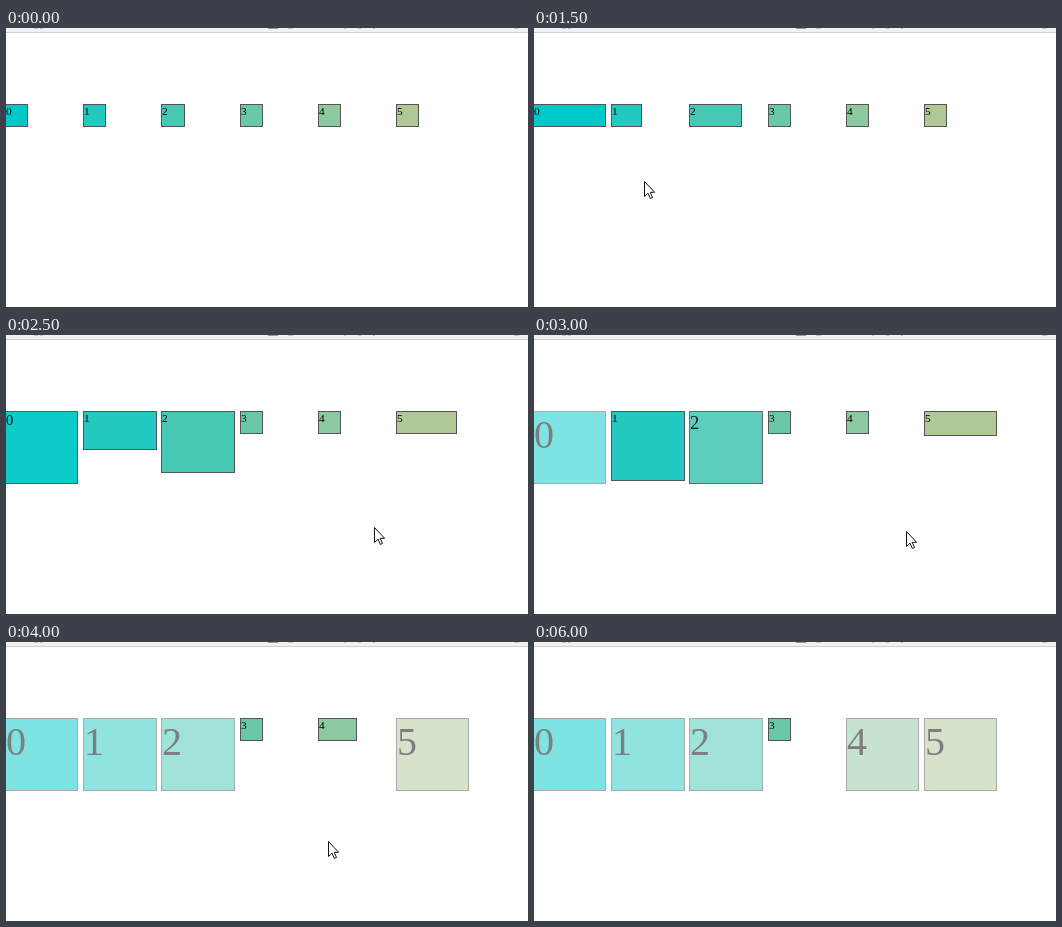
Write an HTML page that moves like this. It is 522 px wide and 279 px high and loops after 6.5 s.

```html
<!DOCTYPE html>
<html lang="en">
<head>
<meta charset="utf-8">
<title>Growing boxes</title>
<style>
  html, body { margin: 0; width: 100%; height: 100%; overflow: hidden; background: #fff; }
  svg { display: block; }
  text { font-family: "Liberation Serif", "Times New Roman", serif; fill: #000; }
  #boxes rect { stroke: #555; }
  #cursor { fill: #fff; stroke: #111; stroke-linejoin: round; }
</style>
</head>
<body>
<svg width="522" height="279" viewBox="0 0 522 279">
  <rect width="522" height="4" fill="#f1f1f1"/>
  <rect y="4" width="522" height="1" fill="#cfcfcf"/>
  <path d="M28 .5h4m2 0h3M282 .5h5M338 .5h2m12 0h3M367 .5h2M508 .5h5" stroke="#c4c4c4"/>
  <path d="M262 .5h10" stroke="#999"/>
  <g id="boxes"></g>
  <path id="cursor" d="M.5 .5V15.5L4 12.2 6.3 17.4 8.5 16.5 6.2 11.3H10.6Z"/>
</svg>
<script>
const LOOP = 6500, STEP = 500, TOP = 76, PITCH = 78.2;
const SMALL = 22.2, LARGE = 72.4, TEXT = 11.4, BIG_TEXT = 40, FADE = 0.45;

// Animation clock at each step, in units of one width or height run
const clock = [-1.32, -0.66, 0, 0.66, 1.32, 1.785, 2.25, 2.9, 3.55, 4.06, 4.57, 5.25, 6];
// Clock value at which the pointer enters each box
const starts = [-0.31, 0.41, 0.1, Infinity, 3.17, 1.12];
const pointer = [
  null, null, [171, 86], [110, 153], [356, 222], [368, 192], [372, 196],
  [362, 150], [322, 199], [235, 204], [148, 218], [105, 264], null
];

const swing = p => 0.5 - Math.cos(Math.PI * Math.min(1, Math.max(0, p))) / 2;
const mix = (a, b, k) => a + (b - a) * k;

function add(parent, tag) {
  return parent.appendChild(document.createElementNS("http://www.w3.org/2000/svg", tag));
}

function set(el, attrs) {
  for (const name in attrs) el.setAttribute(name, attrs[name]);
}

const boxes = starts.map((start, i) => {
  const group = add(document.getElementById("boxes"), "g");
  const rect = add(group, "rect");
  const label = add(group, "text");
  const left = PITCH * i - 1;
  const x = Math.round(left);
  set(rect, { x: x + 0.5, y: TOP + 0.5, fill: `rgb(${35 * i},200,${200 - 10 * i})` });
  set(label, { x: x + 1 });
  label.textContent = i;
  return { start, group, rect, label, left, x };
});
const cursor = document.getElementById("cursor");

// Each box widens, then grows taller, then fades while its digit enlarges
function drawBox(box, now) {
  const age = now - box.start;
  const fade = swing((age - 2) / FADE);
  const size = mix(TEXT, BIG_TEXT, fade);
  set(box.rect, {
    width: Math.round(box.left + mix(SMALL, LARGE, swing(age))) - box.x,
    height: Math.round(mix(SMALL, LARGE, swing(age - 1)))
  });
  set(box.label, { y: TOP + 1 + size * 0.891, "font-size": size });
  set(box.group, { opacity: mix(1, 0.5, fade) });
}

let shown = -1;
function draw() {
  const step = Math.floor(performance.now() % LOOP / STEP);
  if (step !== shown) {
    shown = step;
    boxes.forEach(box => drawBox(box, clock[step]));
    const spot = pointer[step];
    set(cursor, {
      visibility: spot ? "visible" : "hidden",
      transform: `translate(${spot || [0, 0]})`
    });
  }
  requestAnimationFrame(draw);
}
draw();
</script>
</body>
</html>
```
